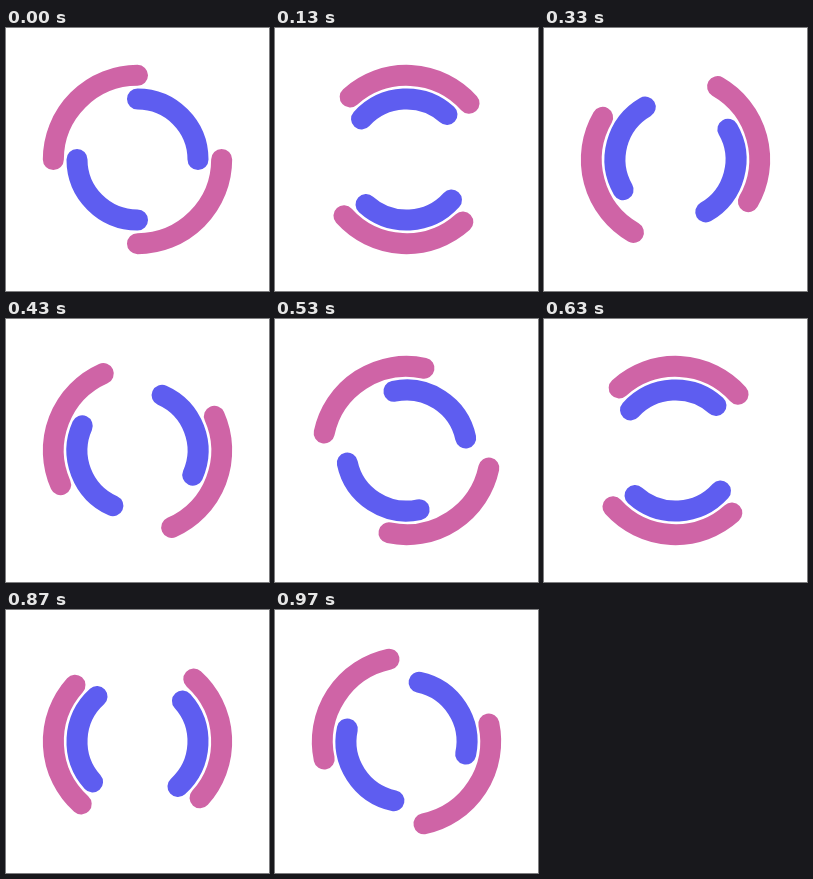
An HTML page that plays this animation: 263 by 263 pixels, repeating every 1000 ms.

```html
<!DOCTYPE html>
<html lang="en">
<head>
<meta charset="utf-8">
<title>Double ring spinner</title>
<style>
  html, body { margin: 0; width: 100%; height: 100%; overflow: hidden; background: #fff; }
  svg { display: block; width: 100vw; height: 100vh; }
  path { fill: none; stroke-width: 8; stroke-linecap: round; }
</style>
</head>
<body>
<svg viewBox="-50 -50 100 100">
  <path id="outer" stroke="#cf64a6" d="M32 0A32 32 0 0 1 0 32M-32 0A32 32 0 0 1 0 -32"/>
  <path id="inner" stroke="#5e5df0" d="M0 -23A23 23 0 0 1 23 0M0 23A23 23 0 0 1 -23 0"/>
</svg>
<script>
  const LOOP = 1000;
  const STEPS = 30;
  const outer = document.getElementById('outer');
  const inner = document.getElementById('inner');

  // Steps begin at multiples of LOOP / STEPS, rounded to 10 ms.
  function stepAt(ms) {
    const ticks = Math.floor((ms % LOOP) / 10);
    return Math.floor((ticks + 0.5) * 10 * STEPS / LOOP);
  }

  function draw(ms) {
    const angle = stepAt(ms) * 360 / STEPS;
    outer.setAttribute('transform', `rotate(${angle})`);
    inner.setAttribute('transform', `rotate(${-angle})`);
  }

  const start = performance.now();
  function tick() {
    draw(performance.now() - start);
    requestAnimationFrame(tick);
  }
  tick();
</script>
</body>
</html>
```
